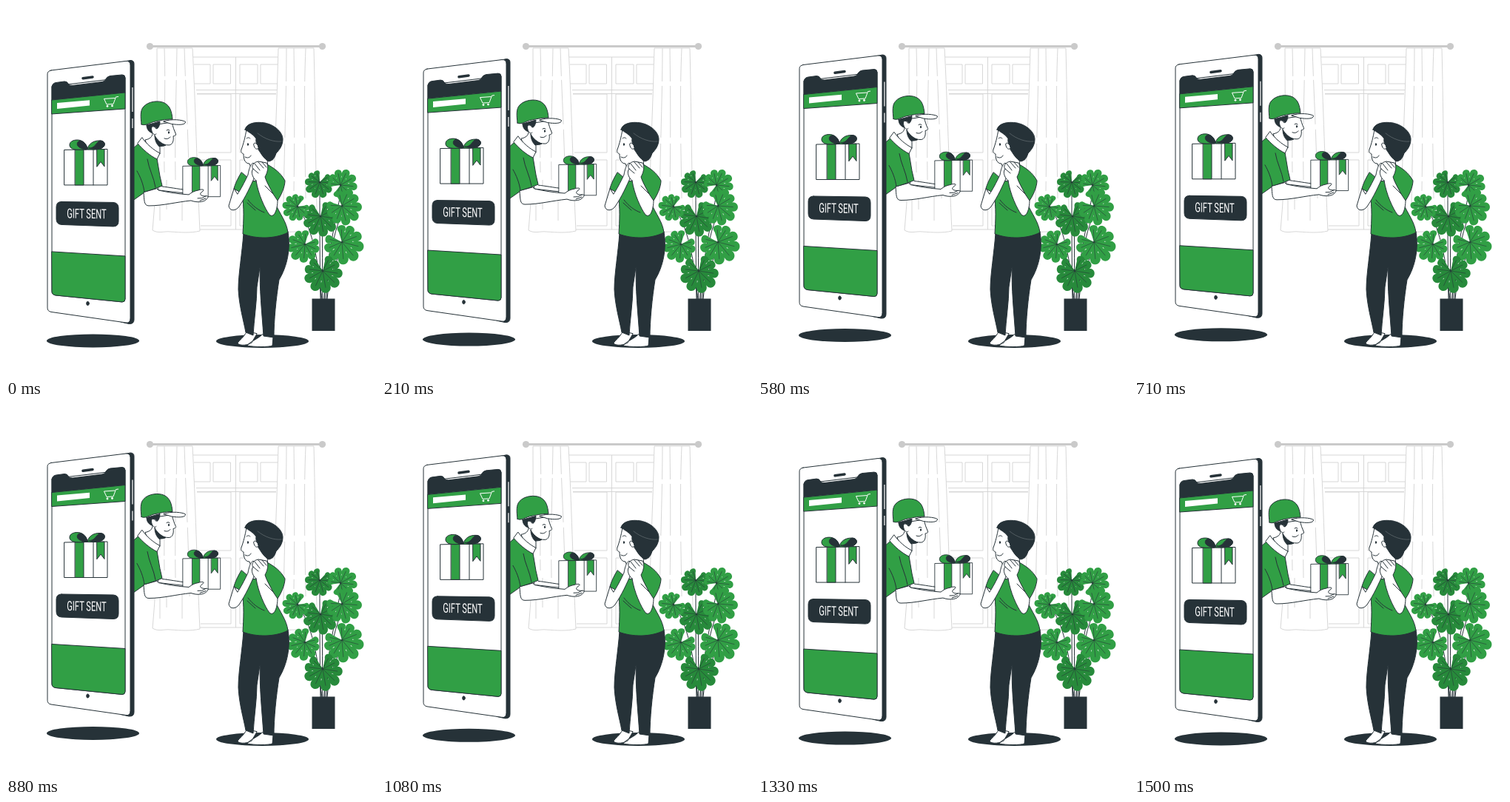
Animation, 500 px wide and 500 px high, one loop 1.54 s. Source, as an HTML page:

```html
<!DOCTYPE html>
<html lang="en">
<head>
<meta charset="utf-8">
<title>Gift sent</title>
<style>
  html, body { margin: 0; height: 100%; overflow: hidden; background: #fff; }
  svg { display: block; width: 100%; height: 100%; }
  .ink { stroke: #263238; stroke-width: 1; stroke-linejoin: round; stroke-linecap: round; }
  .line { fill: none; }
  .white { fill: #fff; }
  .green { fill: #319f45; }
  .dark { fill: #263238; }
  .pale { fill: none; stroke: #d3d3d3; stroke-width: .9; }
  text { font: 18px Roboto, sans-serif; fill: #fff; text-anchor: middle; }
</style>
</head>
<body>
<svg viewBox="0 0 500 500">
  <defs>
    <g id="gift" class="ink">
      <path class="white" d="M79 194.5L137 193.5V242H79Z"/>
      <path class="line" d="M118 194V242"/>
      <path class="green" d="M93.5 194.3H105V242H93.5ZM123 193.7H133V217L128 210.500L123 217Z"/>
      <path class="green" d="M108 194C100 194 88 196 86 189C85 182 94 180 100 181.500C106 183 109 189 110 193ZM110 193C112 186 118 182 126 182C134 182 135 188 131 191C126 195 116 194 110 194Z"/>
      <path class="dark" d="M108 194C100 193 94 189 97 184C100 180 109 184 110 193ZM112 192C120 193 122 184 127 182C134 182 135 188 131 191C127 194 118 194 112 192Z"/>
    </g>
  </defs>

  <!-- window -->
  <g class="pale">
    <path d="M253 69H367M254 79H276V105H254M280 79H303.500V105H280ZM316 79H340V105H316ZM367 79H344V105H367M257 113.500H366M258 118.500H365M310.500 69V302M258 119H304V198H260M260 208H304V297H263M365 119H316V198H363M363 208H316V297H325M262 302H376"/>
  </g>
  <!-- curtains -->
  <g class="pale">
    <path class="white" d="M204 57C204 140 206 220 198 303C206 308 214 304 222 305C236 306 250 307 262 304C258 220 256 130 252 57Z"/>
    <path d="M214 57C216 110 213 170 214 225M231 57C230 120 228 180 229 235M241 57C243 120 247 190 248 260" stroke-dasharray="38 5 60 7"/>
    <path d="M217 235V275M208 255V290M238 245V290"/>
    <path class="white" d="M368 57C366 140 362 220 360 304C375 307 400 304 421 304C418 220 418 130 416 57Z"/>
    <path d="M379 57C379 120 376 190 375 270M389 57C390 120 390 180 389 250M405 57C402 130 404 190 405 260" stroke-dasharray="45 6 70 8"/>
  </g>
  <g fill="#cacaca">
    <path d="M195 53H427V56H195Z"/>
    <circle cx="194.500" cy="54.500" r="4.600"/><circle cx="427.500" cy="54.500" r="4.600"/>
  </g>

  <!-- plant -->
  <path class="ink line" d="M425 396C424 350 424 290 424 245M428 396C427 360 428 320 427 290M430 396C433 340 448 280 454 242M433 396C434 360 440 310 455 278M426 396C424 350 412 290 394 274M427 396C424 370 415 340 404 326M434 396C436 370 445 345 456 326M431 396V365"/>
  <g id="leaves"></g>
  <path class="dark" d="M413.500 395.500H444.500V439H413.500Z"/>

  <!-- customer -->
  <ellipse class="dark" cx="346.500" cy="453" rx="62.500" ry="9"/>
  <g class="ink">
    <path class="white" d="M325 440C322 448 314 452 313 456C317 460 328 458 332 455L339 443ZM346 444C341 450 328 454 326 459C336 461 355 461 360 459L361 447Z"/>
    <path class="dark" d="M321 307C319 335 314 362 314 383C315 405 321 425 324 441L334 445C335 425 339 400 339 380L343.500 350C342 380 346 415 348 446L362 448C362 425 365 395 369 370C380 352 385 328 381 305Z"/>
    <path class="white" d="M325 167C323 178 321 186 318 194C317 198 319 199 321 200C321 207 323 213 329 213L333 224H354L353 205L345 172Z"/>
    <path class="dark" d="M323 167C325 158 338 156 350 158C364 161 374 171 374 180C374 189 369 195 365 199C363 206 360 209 355 210C349 207 345 200 341 194C340 190 337 184 338 179C334 173 327 170 323 167Z"/>
    <path class="white" d="M340 188C337 183 333 185 335.500 190C337 194 340 194 341 192Z"/>
    <path class="green" d="M318 225C313 233 309 242 308 247L319 253C322 273 321 290 320 308C338 315 364 315 381 306C379 291 370 281 364 267C372 257 377 244 377 236C371 225 362 219 353 214L345 238L332 236Z"/>
    <path class="white" d="M308 247L301 270C302 278 311 277 315 271C324 258 331 242 336 231C340 225 338 216 334 212C330 214 328 222 327 228C322 239 317 248 313 254Z"/>
    <path class="white" d="M338 236C341 255 350 274 356 282C363 288 367 273 367 263L361 254C357 246 352 238 350 231C354 224 355 216 352 212L341 210C334 211 331 217 334 220C330 225 334 233 338 236Z"/>
    <path class="line" d="M336 213L343 222M341 211L348 219M346 211L352 218M334 220L341 226M327 262C333 270 341 276 349 279M326 266L337 276M361 254L350 243M325 179C327 177 329 178 330 179M323 204C326 206 330 205 331 202"/>
    <path d="M340 172C350 180 362 184 372 183" fill="none" stroke="#71797d" stroke-width=".6"/>
    <ellipse class="dark" cx="327" cy="187" rx=".6" ry="1.500"/>
  </g>

  <g id="floating">
    <ellipse class="dark" cx="117.500" cy="452.500" rx="62.500" ry="9"/>

    <!-- courier -->
    <g class="ink">
      <path class="white" d="M205 235L211 244C220 245 231 247 246 249L250 254L206 249Z"/>
      <path class="white" d="M193 162L224 157C226 164 227 168 229.500 173C230 175 228 175.500 226 176C227 182 225 188 220 188C215 188 212 187 208 185L208 200C198 197 190 188 188 181C194 180 198 177 198 172Z"/>
      <path class="dark" d="M190 161L208 156C208 161 206 165 204 166C201 161 197 163 198 168L199 172C193 171 190 166 190 161ZM201 175C204 181 210 186 216 188C213 190 209 189 207 190C203 186 201 181 201 175Z"/>
      <path class="white" d="M203 166C199 160 195 163 197 169C198 173 201 175 203 173"/>
      <path class="white" d="M213 156C224 152 239 154 242.500 156.500C243 161 233 161 224 159.500Z"/>
      <path class="green" d="M183 160C182 150 181 141 186 136C192 129 206 127 214 131C222 135 224 143 225 153C214 153 208 155 202 156C195 157 188 163 183 160Z"/>
      <path class="line" d="M217 168Q219 166 221 168M214 179Q219 181 222 177"/>
      <ellipse class="dark" cx="220" cy="171" rx=".6" ry="1.400"/>
      <path class="green" d="M170 194L179 186C188 196 196 203 204 206L208 230L211 243C202 247 194 249 187 252L170 264Z"/>
      <path class="white" d="M184 178C190 187 200 195 208 199L204 207C194 202 185 194 178 186Z"/>
      <path class="line" d="M187 252C186 241 181 230 177 223M191 207C193 220 200 232 202 245"/>
      <use href="#gift" transform="translate(170.500 47.200) scale(.87)"/>
      <path class="white" d="M186 252C187 262 186 270 193 270C212 270 230 265 250 263C258 266 267 265 270 262C274 259 274 256 270 257C264 257 260 255 265 251C270 248 265 247 260 249C254 250 251 252 247 255C232 254 220 252 206 249L204 247Z"/>
      <path class="line" d="M259 260Q265 261 270 257M262 263L270 260"/>
    </g>

    <!-- phone -->
    <g class="ink">
      <path class="dark" d="M158 75.500L168 73.500Q173 73.500 173 78V424Q173 430 166 429.500L155 427Z"/>
      <path class="white" d="M61 87L162 74.500Q168 74 168 80V422Q168 429 162 428L61 413.500Q56 412.500 56 408V92Q56 88 61 87Z"/>
      <path class="white" d="M62 109V386Q62 390 67 391L157 400Q161 400 161 396V97Z"/>
      <path class="dark" d="M62 127V109Q63 104 68 103.500L79 102Q83 102 84 105Q86 108 90 107.500L130 102.500Q134 102 135 98.500Q137 95 141 94.500L157 93Q161 93 161 97V117Z"/>
      <path class="green" d="M62 127L161 117V139L62 146ZM62 332L161 338V396Q161 400 157 400L67 391Q62 390 62 386Z"/>
      <path class="dark" d="M75 264.500L145 265.500Q152 266 152 273V291Q152 298 145 298L75 295.500Q68 295 68 288V271.500Q68 264.500 75 264.500Z"/>
      <path class="line" d="M104 97.700L117 96" style="stroke-width:3.500"/>
      <ellipse class="dark" cx="110.500" cy="402" rx="1.800" ry="2.600"/>
    </g>
    <path class="white" d="M69 131L113 127.200V134.500L69 139ZM170.300 110H171.500V143H170.300ZM170.300 152H171.500V165H170.300Z"/>
    <path d="M152 122.500L148.500 123L145 132.500L136 133L132.500 125.500L147.500 124.500" fill="none" stroke="#fff" stroke-width="1"/>
    <circle class="white" cx="137" cy="135.500" r="1.400"/><circle class="white" cx="143.500" cy="135" r="1.400"/>
    <use href="#gift"/>
    <text transform="matrix(.62 .012 0 1 109 287)">GIFT SENT</text>
  </g>
</svg>
<script>
  const LOOP = 1540, STEPS = 37, LIFT = 8.2, PHASE = 40;
  const floating = document.getElementById('floating');

  // Monstera leaf: nine broad lobes fanned around the tip direction, with a vein in each.
  function leaf(x, y, size, turn, fill) {
    const at = (angle, radius) => {
      const r = size * radius;
      return `${(r * Math.cos(angle)).toFixed(1)} ${(r * Math.sin(angle)).toFixed(1)}`;
    };
    let blade = 'M0 0', veins = '';
    for (let i = -4; i <= 4; i++) {
      const a = i * 0.62, reach = 1 + 0.2 * Math.cos(a);
      blade += `L${at(a - 0.27, 0.5)}C${at(a - 0.46, 1.2 * reach)} ${at(a + 0.44, 1.25 * reach)} ${at(a + 0.27, 0.5)}`;
      veins += `M0 0L${at(a, 0.7 * reach)}`;
    }
    return `<g transform="translate(${x} ${y}) rotate(${turn})">
      <path d="${blade}Z" fill="${fill}"/>
      <path d="${veins}" class="ink line" style="stroke-width:.5"/></g>`;
  }

  const light = '#319f45', deep = '#278a3b';
  document.getElementById('leaves').innerHTML = [
    [425, 284, 25, 80, deep], [424, 238, 20, 110, deep], [452, 242, 21, -30, light],
    [394, 271, 19, 150, light], [454, 270, 25, 40, light], [404, 322, 23, 130, light],
    [454, 319, 28, 50, light], [428, 358, 27, 80, deep]
  ].map(l => leaf(...l)).join('');

  function draw(now) {
    const step = Math.floor(((now + 3) % LOOP) / LOOP * STEPS);
    const time = step * LOOP / STEPS;
    const rise = LIFT * (1 - Math.cos(2 * Math.PI * (time + PHASE) / LOOP)) / 2;
    floating.setAttribute('transform', `translate(0 ${-rise})`);
    requestAnimationFrame(draw);
  }
  draw(0);
</script>
</body>
</html>
```
